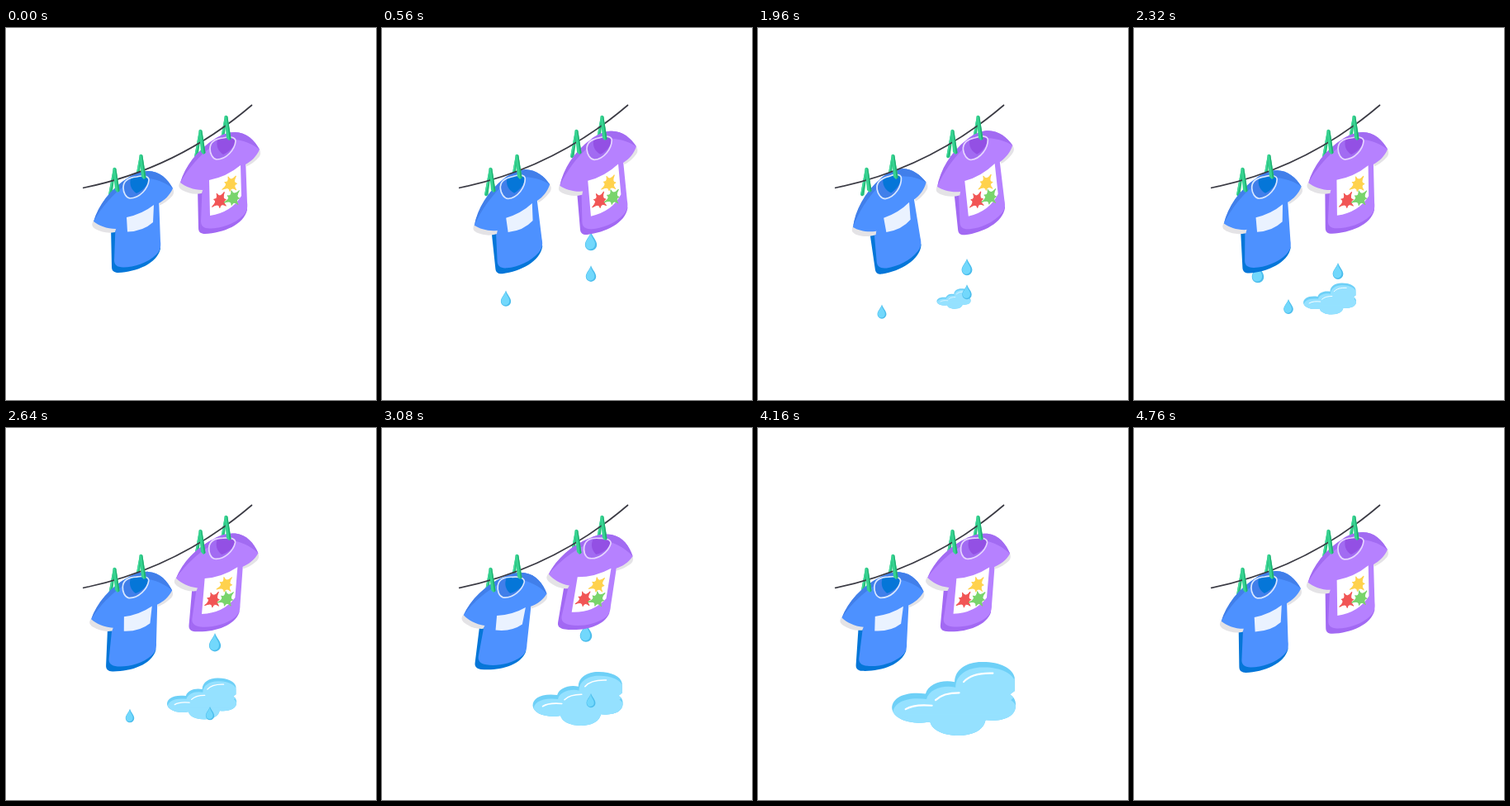
An HTML page for the animation above (4800 ms loop, 448x450 px).

```html
<!DOCTYPE html>
<html lang="en">
<head>
<meta charset="utf-8">
<title>Laundry line</title>
<style>
  html, body { margin: 0; width: 100%; height: 100%; overflow: hidden; background: #fff; }
  svg { display: block; width: 100%; height: 100%; }
</style>
</head>
<body>
<svg id="stage" viewBox="0 0 448 450">
  <defs>
    <path id="pool" d="M169 338C169 327 182 319 206 322C209 311 224 306 238 309C238 295 252 286.500 269 287C288 287 302 294 304 304V319C301 321 300 322 299 323C304 326 306 331 305 337C304 347 291 353 272 351C270 362 258 368 242 368C226 368 213 362 211 353C188 357 170 349 169 338Z"/>
    <clipPath id="poolClip"><use href="#pool"/></clipPath>
    <g id="drop">
      <path d="M0-11C2-5 7-1 7 4A7 7 0 0 1-7 4C-7-1-2-5 0-11Z" fill="#4cbdec"/>
      <path d="M-.4-9.500C-2-4-6.400-1-6.300 4C-6 8-3 9.800 0 9.300C4 8.500 5.600 5 4.500 1C3.600-2 .6-5-.4-9.500Z" fill="#72d8fc"/>
    </g>
    <g id="legBack">
      <path d="M-1 0L1.500 2L-2.500 33L-5 34.500L-7 33Z" fill="#27c07c"/>
      <path d="M-1 1L-2 16L-6 33L-7 33Z" fill="#45dda0"/>
    </g>
    <g id="legFront">
      <path d="M-1.500 1Q.5-1.500 2.300 1L6.500 28L4 30L1 27Z" fill="#36d391"/>
      <path d="M1.200 .5L2.300 1L6.500 28L4.800 29.500Z" fill="#1fae70"/>
    </g>
  </defs>
  <g id="puddle">
    <use href="#pool" fill="#6ed0f7"/>
    <g clip-path="url(#poolClip)"><use href="#pool" y="6" x="1" fill="#95e1ff"/><path d="M180 345H300V366H211Z" fill="#95e1ff"/></g>
    <path d="M184 339C192 334 202 334 213 335M217 329C223 323 232 321 243 321M248 309C255 301 266 299 280 299.500" fill="none" stroke="#fff" stroke-width="2" stroke-linecap="round"/>
  </g>
  <g id="drops"></g>
  <g id="backs"></g>
  <g id="shirts"></g>
  <path d="M93 193.500Q207.500 170.500 298 93" fill="none" stroke="#3b3b44" stroke-width="1.700"/>
  <g id="fronts"></g>
</svg>
<script>
const LOOP = 4800;
const $ = id => document.getElementById(id);

function add(parent, tag, attrs = {}) {
  const el = document.createElementNS("http://www.w3.org/2000/svg", tag);
  for (const k in attrs) el.setAttribute(k, attrs[k]);
  return parent.appendChild(el);
}

const fill = (parent, d, color) => add(parent, "path", { d, fill: color });

// Paint splash: uneven arms joined by inward curves
function splat(parent, x, y, turn, color) {
  const arms = [12, 7.5, 9.5, 8.5, 12, 7.5, 9.5];
  const step = 2 * Math.PI / arms.length;
  const polar = (r, i) => {
    const a = turn + i * step;
    return (x + r * Math.cos(a)).toFixed(1) + " " + (y + r * Math.sin(a)).toFixed(1);
  };
  const d = "M" + polar(arms[0], 0) +
    arms.map((r, i) => "Q" + polar(2.6, i + .5) + " " + polar(arms[(i + 1) % arms.length], i + 1)).join("");
  add(parent, "path", { d, fill: color, stroke: color, "stroke-width": 1, "stroke-linejoin": "round" });
}

// The hem and the print swing apart from the shoulders
function shirt(x, y, c) {
  const root = add($("shirts"), "g", { transform: `translate(${x} ${y})` });
  const [hem, top, print] = [0, 1, 2].map(() => add(root, "g"));

  fill(hem, "M127 240L128 289C128 294 131 296 136 296C158 295 183 285 187 267L180 220L135 236Z", c.dark);
  fill(hem, "M133 228L131 281C131 286 134 289.500 142 289.500C155 289.500 172 284 182 274C186 270 188 266 187 258L185 204Z", c.main);

  // cuffs
  fill(top, "M106 233C103 238 104 240 108 243C116 247.500 124 248.500 132 247L134 240Z", "#e4e3e6");
  fill(top, "M201 192C204 197 204 201 200 204.500C196 209 190 213 186 214.500L184 208Z", "#e4e3e6");
  // yoke and shoulders
  fill(top, "M148 181C156 176 164 173 172 173C186 173 196 183 202 194C198 203 192 208 185 212L133 243C122 243 112 239 106 234C112 216 126 195 148 181Z", c.main);
  fill(top, "M106 234C112 214 126 195 148 181C143 184 142 188 142 192C130 201 116 216 106 234Z", c.shade);
  fill(top, "M148 181C156 176 164 173 172 173C186 173 196 183 202 194C194 188 186 184 173 182L158 180Z", c.shade);
  // collar
  const neck = "M142 193C142 185 149 181 158 180C166 178 173 179 173 184C172 194 162 206 150 206C145 205 142 199 142 193Z";
  fill(top, neck, c.shade);
  fill(top, "M151 182C149 190 152 196 158 200C165 197 171 191 173 184C173 179 166 178 158 180Z", c.neck);
  add(top, "path", { d: neck, fill: "none", stroke: c.trim, "stroke-width": 1.700 });

  const turn = (el, angle) => el.setAttribute("transform", `rotate(${angle} 156 180)`);
  const pose = (shoulders, body) => {
    turn(top, shoulders);
    turn(hem, body);
    turn(print, body);
  };
  return { print, pose };
}

const blue = shirt(0, 0, { main: "#4d91ff", shade: "#417fea", dark: "#0576d8", neck: "#0576d8", trim: "#d8e7ff" });
fill(blue.print, "M146 229Q165 225 179 214L178 235Q166 246 147 246.500Z", "#eaf2ff");

const purple = shirt(105, -47, { main: "#b681ff", shade: "#a26bf2", dark: "#a269f3", neck: "#9350e4", trim: "#e6d5ff" });
fill(purple.print, "M141 231Q162 227 179 213L180 250Q168 270 142 274Z", "#fff");
splat(purple.print, 167, 236, -1, "#ffd24d");
splat(purple.print, 154, 256, -1.100, "#f15555");
splat(purple.print, 170, 253, -.9, "#79d46c");

for (const [x, y] of [[131, 169], [163, 153], [235, 123], [266, 106]]) {
  add($("backs"), "use", { href: "#legBack", x, y });
  add($("fronts"), "use", { href: "#legFront", x, y });
}

// Streams of drops: place, fall range and start times
const streams = [
  { x: 253, from: 236, to: 346, starts: [179, 423, 1441, 1629, 2496] },
  { x: 247, from: 237, to: 350, starts: [726, 1965, 3016] },
  { x: 150, from: 282, to: 353, starts: [279, 1579, 2228, 3410] },
  { x: 183, from: 280, to: 355, starts: [1139] },
  { x: 187, from: 280, to: 356, starts: [1965, 3098] }
];
const SPEED = .16;
const drops = streams.flatMap(s => s.starts.map(start =>
  ({ ...s, start, el: add($("drops"), "use", { href: "#drop" }) })));

const clamp = v => Math.max(0, Math.min(1, v));

// Swing: out to low, across to high, back to rest
function swing(t, low, high) {
  const third = LOOP / 3, u = (t % third) / third;
  if (t < third) return low * Math.sin(u * Math.PI / 2);
  if (t < 2 * third) return low + (high - low) * (1 - Math.cos(u * Math.PI)) / 2;
  return high * Math.cos(u * Math.PI / 2);
}

const growth = [[1200, 0], [1320, .075], [1960, .302], [2640, .618], [3560, 1], [4000, 1.100]];
function poolSize(t) {
  if (t <= 1200) return 0;
  if (t >= 4000) return 1.100 * (1 - clamp((t - 4200) / 520) ** 3);
  const i = growth.findIndex(k => k[0] > t);
  const [t0, a] = growth[i - 1], [t1, b] = growth[i];
  return a + (b - a) * (t - t0) / (t1 - t0);
}

function draw(t) {
  blue.pose(swing(t, -11.3, 8.500), swing(t, -9.3, 8.500));
  purple.pose(swing(t, -8.500, 11), swing(t, -6.9, 11));

  const size = poolSize(t);
  $("puddle").setAttribute("visibility", size > 0 ? "visible" : "hidden");
  $("puddle").setAttribute("transform", `translate(237 327.500) scale(${size}) translate(-237 -327.500)`);

  for (const d of drops) {
    const y = d.from + (t - d.start) * SPEED;
    const on = t >= d.start && y <= d.to;
    d.el.setAttribute("visibility", on ? "visible" : "hidden");
    if (!on) continue;
    const rest = d.from + 18;
    const k = 1.040 - .32 * clamp((y - rest) / (d.to - rest));
    d.el.setAttribute("transform", `translate(${d.x} ${y}) scale(${k})`);
  }
}

const begin = performance.now();
function tick() {
  draw((performance.now() - begin) % LOOP);
  requestAnimationFrame(tick);
}
tick();
</script>
</body>
</html>
```
